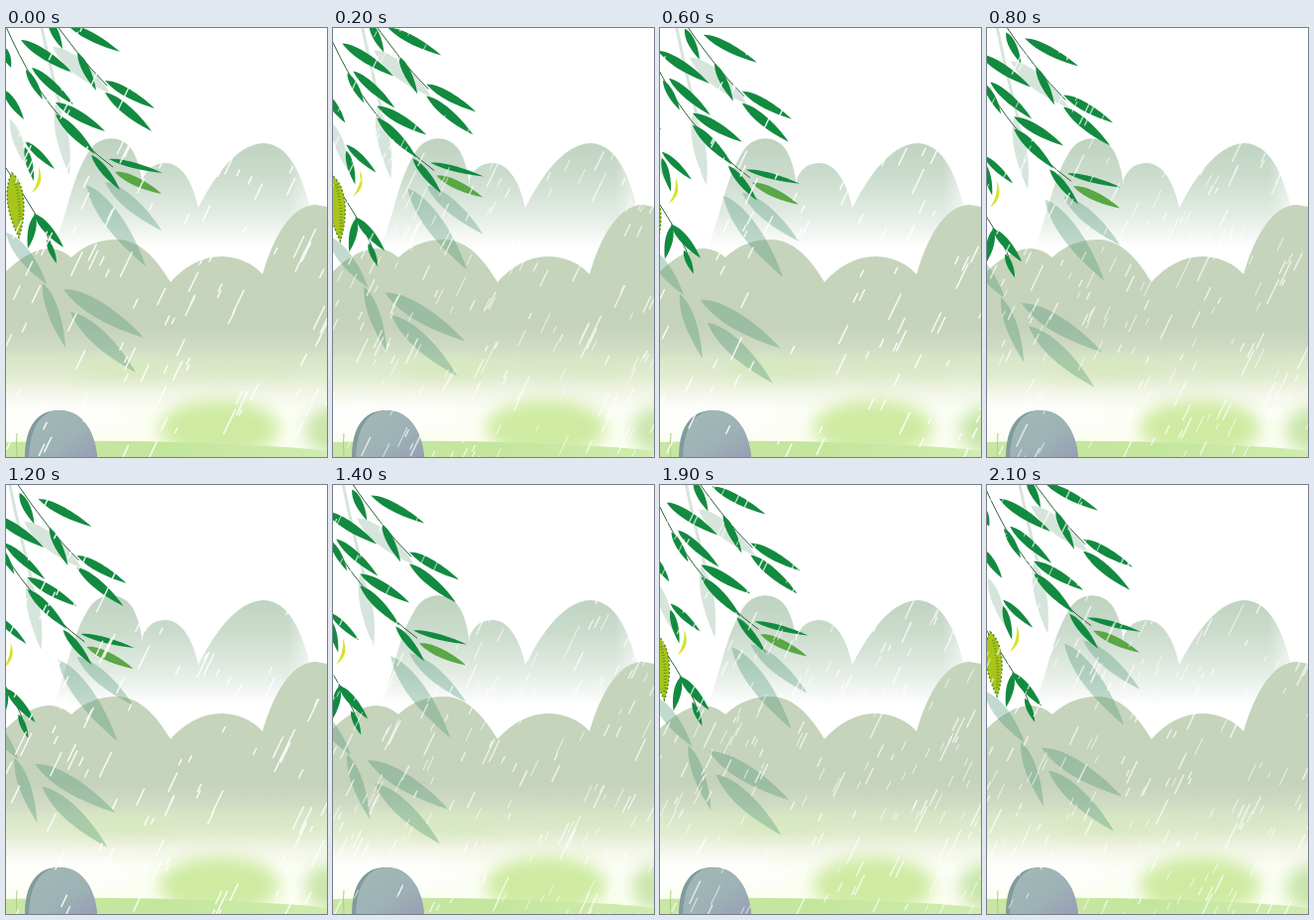
Recreate the animation shown at these times as an HTML page. Size 324 by 432 pixels, loop 2.2 s.

```html
<!DOCTYPE html>
<html lang="en">
<head>
<meta charset="utf-8">
<title>Spring rain</title>
<style>
html, body { margin: 0; width: 100%; height: 100%; overflow: hidden; background: #fff; }
svg { display: block; width: 100vw; height: 100vh; }
</style>
</head>
<body>
<svg viewBox="0 0 324 432" preserveAspectRatio="none">
  <defs>
    <linearGradient id="far" gradientUnits="userSpaceOnUse" x1="0" y1="110" x2="0" y2="222">
      <stop offset="0" stop-color="#bed2bf"/>
      <stop offset=".35" stop-color="#cbdccd"/>
      <stop offset=".7" stop-color="#e3ece4"/>
      <stop offset="1" stop-color="#fff"/>
    </linearGradient>
    <linearGradient id="haze">
      <stop offset=".78" stop-color="#fff" stop-opacity="0"/>
      <stop offset="1" stop-color="#fff" stop-opacity=".75"/>
    </linearGradient>
    <linearGradient id="near" gradientUnits="userSpaceOnUse" x1="0" y1="178" x2="0" y2="432">
      <stop offset="0" stop-color="#c5d5bc"/>
      <stop offset=".48" stop-color="#c5d3ba"/>
      <stop offset=".57" stop-color="#d0dcc4"/>
      <stop offset=".61" stop-color="#d9e6c8"/>
      <stop offset=".68" stop-color="#e2ecd0"/>
      <stop offset=".75" stop-color="#f3f6e9"/>
      <stop offset=".82" stop-color="#fcfef6"/>
      <stop offset="1" stop-color="#fbfeee"/>
    </linearGradient>
    <linearGradient id="ground">
      <stop offset="0" stop-color="#c9e6a4"/>
      <stop offset=".5" stop-color="#c3e69c"/>
      <stop offset="1" stop-color="#d0ecb0"/>
    </linearGradient>
    <linearGradient id="stone" x2="1" y2="1">
      <stop offset="0" stop-color="#a3b8b8"/>
      <stop offset=".6" stop-color="#9db2b4"/>
      <stop offset="1" stop-color="#979db6"/>
    </linearGradient>
    <filter id="soft" x="-50%" y="-50%" width="200%" height="200%"><feGaussianBlur stdDeviation="8"/></filter>
  </defs>

  <rect width="324" height="432" fill="#fff"/>
  <g fill="url(#far)">
    <path d="M138 222V152C144 138 154 136 162 136C181 137 190 163 194 181L200 222Z"/>
    <path d="M48 222C61 190 66 153 82 127C93 106 118 107 128 124C136 138 140 160 144 222Z"/>
    <path d="M180 222L194 181C207 156 230 117 260 116C287 117 298 150 305 174L314 222Z"/>
  </g>
  <path d="M180 222L194 181C207 156 230 117 260 116C287 117 298 150 305 174L314 222Z" fill="url(#haze)"/>
  <path d="M0 432V245C16 230 30 222 45 222Q57 223 66 231C80 218 95 213 112 213C138 213 155 238 166 256C180 240 198 230 218 230Q243 231 259 248C270 210 288 178 313 178L324 180V432Z" fill="url(#near)"/>

  <g filter="url(#soft)">
    <ellipse cx="122" cy="344" rx="55" ry="8" fill="#d3e8b5" opacity=".65"/>
    <ellipse cx="240" cy="338" rx="65" ry="7" fill="#d5e5c0" opacity=".6"/>
    <ellipse cx="40" cy="392" rx="90" ry="15" fill="#fff" opacity=".7"/>
    <ellipse cx="215" cy="403" rx="61" ry="29" fill="#cfeba2"/>
    <ellipse cx="330" cy="405" rx="28" ry="24" fill="#c9e6ab"/>
  </g>
  <path d="M0 417Q100 414 200 418T324 426V432H0Z" fill="url(#ground)"/>
  <path d="M11 432Q10 418 11 408" fill="none" stroke="#a9cf80"/>
  <path d="M19 432C19 405 29 385 53 385C79 385 90 409 92 432Z" fill="#809b9d"/>
  <path d="M23 432C24 407 32 386 54 385C79 385 90 409 92 432Z" fill="url(#stone)"/>

  <g id="willow"></g>
  <g fill="none" stroke="#fff" stroke-linecap="round">
    <path id="streaks" stroke-width="1.5"/>
    <path id="drizzle" stroke-width="1.1"/>
  </g>
</svg>
<script>
const LOOP = 2200, STEP = 100, FALL = 480, SLANT = 0.48;
const $ = id => document.getElementById(id);

// Each leaf: base x, base y, tip x, tip y, width.
const paleLeaves = [
  [47, 19, 105, 66, 16], [50, 76, 64, 148, 13], [4, 92, 22, 142, 10],
  [81, 158, 141, 240, 19], [100, 155, 157, 204, 14], [0, 206, 41, 258, 14],
  [58, 263, 139, 312, 17], [65, 286, 131, 347, 17], [37, 257, 60, 322, 12]
];
const greenLeaves = [
  [61, -4, 115, 24, 9], [42, -10, 57, 21, 8], [72, 25, 91, 63, 8],
  [100, 53, 150, 81, 9], [100, 65, 147, 104, 10], [15, 12, 67, 45, 10],
  [26, 40, 68, 77, 9], [20, 42, 37, 72, 7], [50, 75, 100, 104, 10],
  [50, 87, 90, 127, 10], [-3, 62, 18, 92, 8], [-4, 18, 5, 40, 8],
  [19, 114, 49, 142, 7], [19, 120, 28, 154, 7], [104, 132, 158, 146, 6],
  [86, 128, 115, 163, 8], [28, 187, 58, 221, 9], [29, 188, 22, 222, 8],
  [41, 213, 51, 237, 6]
];

function leafPath([x, y, tipX, tipY, width]) {
  const dx = tipX - x, dy = tipY - y, len = Math.hypot(dx, dy);
  const nx = -dy / len * width, ny = dx / len * width;
  const at = (along, side) =>
    `${(x + dx * along + nx * side).toFixed(1)} ${(y + dy * along + ny * side).toFixed(1)}`;
  return `M${x} ${y}C${at(.2, -.75)} ${at(.65, -.6)} ${tipX} ${tipY}` +
         `C${at(.7, .4)} ${at(.3, .75)} ${x} ${y}Z`;
}
const leaves = (list, color, opacity = 1) =>
  list.map(l => `<path d="${leafPath(l)}" fill="${color}" opacity="${opacity}"/>`).join('');
const stem = (d, color, width) =>
  `<path d="${d}" fill="none" stroke="${color}" stroke-width="${width}"/>`;

const golden = leafPath([6, 146, 13, 211, 17]);
$('willow').innerHTML =
  stem('M30 -30Q42 30 55 80', '#d7e4dc', 3) +
  leaves(paleLeaves.slice(0, 3), '#4d9164', .23) +
  leaves(paleLeaves.slice(3), '#4b9474', .34) +
  stem('M38 -22Q70 26 102 58M-8 -20Q20 48 50 84T108 140M-6 132Q18 168 30 188T45 217', '#29633c', 1) +
  leaves(greenLeaves, '#128a40') +
  leaves([[110, 145, 157, 167, 9]], '#59a745') +
  `<path d="${golden}" fill="#a9c51c"/>` +
  `<path d="${golden}" fill="none" stroke="#4f8a20" stroke-width="1.5" stroke-dasharray="2 2"/>` +
  stem('M9 154Q16 178 13 204', '#66951e', 3).replace('/>', ' stroke-dasharray="1 2"/>') +
  '<path d="M33 140Q40 157 26 166Q34 155 33 140Z" fill="#d5e32c"/>';

function randomFrom(seed) {
  return () => (seed = seed * 16807 % 2147483647) / 2147483647;
}
function makeDrops(count, seed, shortest, longest) {
  const random = randomFrom(seed);
  return Array.from({ length: count }, () => ({
    x: random() * (324 + FALL * SLANT),
    y: random() * FALL,
    len: shortest + (longest - shortest) * random() ** 1.6
  }));
}
const streaks = makeDrops(250, 731, 5, 27);
const drizzle = makeDrops(270, 9127, 5, 19);

function rainPath(drops, cycles, phase) {
  return drops.map(({ x, y, len }) => {
    const fall = (y + cycles * FALL * phase) % FALL;
    return `M${(x - SLANT * fall).toFixed(1)} ${(fall - 30).toFixed(1)}` +
           `l${(-SLANT * len).toFixed(1)} ${len.toFixed(1)}`;
  }).join('');
}

function draw(time) {
  const t = Math.floor(time % LOOP / STEP) * STEP;
  const phase = t / LOOP;
  const sway = 1 - Math.abs(1 - 2 * phase);
  $('willow').setAttribute('transform', `translate(${-31.4 * sway} ${19.8 * sway})`);

  // A finer shower joins between the clear beats of the rain.
  const shower = t % 600 ? 1 : 0;
  $('streaks').setAttribute('d', rainPath(streaks, 2, phase));
  $('streaks').setAttribute('opacity', shower ? .68 : .88);
  $('drizzle').setAttribute('d', rainPath(drizzle, 3, phase));
  $('drizzle').setAttribute('opacity', shower * .6);
}

const start = performance.now();
function tick() {
  draw(performance.now() - start);
  requestAnimationFrame(tick);
}
tick();
</script>
</body>
</html>
```
